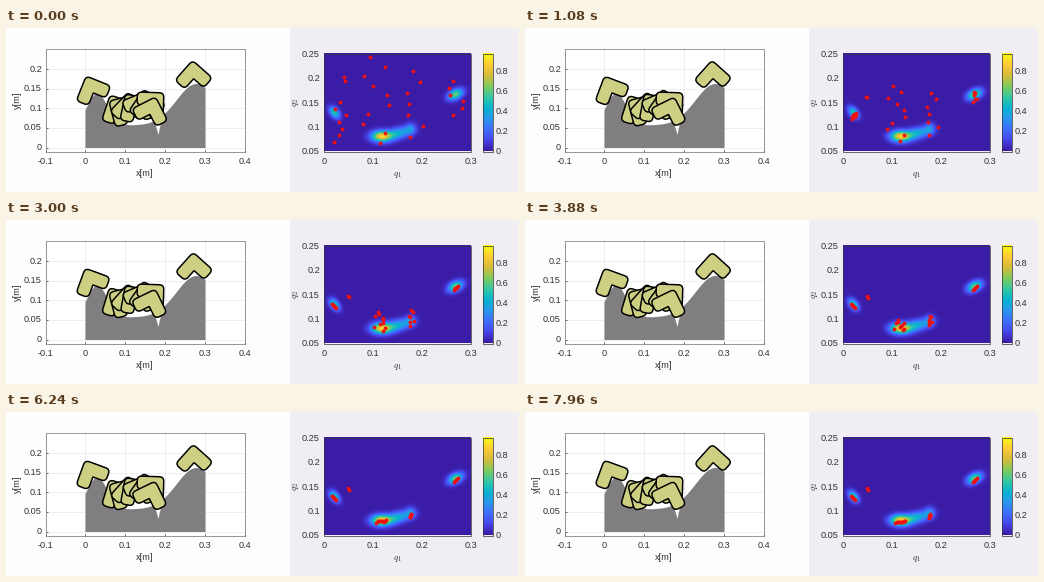
These frames come from a looping animation (513x164 px, 8000 ms). A matplotlib script:

```python
import numpy as np
import matplotlib.pyplot as plt
from matplotlib.animation import FuncAnimation
from matplotlib.colors import LinearSegmentedColormap
from matplotlib.patches import PathPatch, Rectangle
from matplotlib.path import Path

W, H, DPI = 513, 164, 100
STEP, FRAMES = 40, 200
PX = 72 / DPI
INK = "#333333"
rng = np.random.default_rng(4)

plt.rcParams["font.family"] = "Liberation Sans"
plt.rcParams["mathtext.fontset"] = "cm"

fig = plt.figure(figsize=(W / DPI, H / DPI), dpi=DPI, facecolor="#fdfdfd")
ax = fig.add_axes([0, 0, 1, 1])

parula = LinearSegmentedColormap.from_list("parula", [
    "#3a1ca6", "#4746eb", "#3e6fff", "#2797eb", "#08b4cf",
    "#36c8a0", "#81cc59", "#d9ba3a", "#fdcb33", "#f9fb15"])


def label(x, y, s, ha="center", size=9.2, **kw):
    ax.text(x, y, s, fontsize=size * PX, ha=ha, va="center", color=INK, **kw)


def line(xs, ys, color=INK):
    ax.plot(xs, ys, color=color, lw=0.7 * PX, zorder=1,
            solid_capstyle="butt")


def frame_box(x0, y0, x1, y1, z=6, color=INK):
    ax.add_patch(Rectangle((x0, y0), x1 - x0, y1 - y0, fill=False,
                           ec=color, lw=0.7 * PX, zorder=z))


# Left plot: axes and terrain
LX0, LY0, LX1, LY1 = 39.5, 20.5, 238.5, 123.5
ax.add_patch(Rectangle((LX0, LY0), LX1 - LX0, LY1 - LY0, fc="white", zorder=0))
for i in range(6):
    x = LX0 + 39.8 * i
    line([x, x], [LY0, LY1], "#e8e8e8")
    line([x, x], [LY1 - 2, LY1])
    label(x, 133, f"{(i - 1) / 10:g}")
for i in range(5):
    y = 119.5 - 19.6 * i
    line([LX0, LX1], [y, y], "#e8e8e8")
    line([LX0, LX0 + 2], [y, y])
    label(36, y, f"{i / 20:g}", ha="right")
frame_box(LX0, LY0, LX1, LY1, z=2, color="#707070")
label(138.5, 146, "x[m]")
label(11, 72, "y[m]", rotation=90)

gx = np.linspace(79, 199, 121)
ground = (97 - 32 * np.exp(-((gx - 91) / 14) ** 2)
          - 41.5 * np.exp(-((gx - 190) / 28) ** 2)
          + 16 * np.clip(1 - abs(gx - 152) / 4, 0, 1))
ax.fill_between(gx, ground, 119.5, color="#807e80", lw=0, zorder=3)


def rounded(points, radii):
    """Closed path whose corners are cut by quadratic curves."""
    verts, codes = [], []
    for i, (p, r) in enumerate(zip(points, radii)):
        before, after = points[i - 1] - p, points[(i + 1) % len(points)] - p
        verts += [p + r * before / np.hypot(*before), p,
                  p + r * after / np.hypot(*after)]
        codes += [Path.LINETO, Path.CURVE3, Path.CURVE3]
    codes[0] = Path.MOVETO
    return Path(verts + [verts[0]], codes + [Path.CLOSEPOLY])


def turn(points, deg):
    a = np.radians(deg)
    return points @ np.array([(np.cos(a), np.sin(a)), (-np.sin(a), np.cos(a))])


ARM, THICK = 26.5, 13
corners = np.array([(0, 0), (ARM, 0), (ARM, THICK), (THICK, THICK),
                    (THICK, ARM), (0, ARM)]) - 11.5
bracket = rounded(turn(corners, 45), [4.5, 4.5, 4.5, 0.5, 4.5, 4.5])


def placed(x, y, deg):
    return Path(turn(bracket.vertices, deg) + (x, y), bracket.codes)


# Brackets as (x, y, angle): two on the hills, a heap in the valley
poses = [(86, 63, -25), (188, 48.5, -3)]
for i, u in enumerate(np.linspace(0, 1, 7)):
    poses.append((111 + 35 * u, 82 - 6 * u, -50 + 75 * u + 22 * (-1) ** i))
poses.append((144, 84.5, 19))
poses = np.array(poses)
drift = rng.uniform(-1, 1, poses.shape) * (0.6, 0.6, 2)

shapes = []
for i, pose in enumerate(poses):
    patch = PathPatch(placed(*pose), fc="#cdd083", ec="black",
                      lw=1.5 * PX, zorder=4 + 0.01 * i)
    shapes.append(ax.add_patch(patch))

# Right plot: density map
ax.add_patch(Rectangle((284, 0), W - 284, H, fc="#f0eef2", zorder=0))
RX0, RY0, RX1, RY1 = 318, 26, 465, 123.5
mx, my = np.meshgrid(np.linspace(RX0, RX1, 60), np.linspace(RY0, RY1, 50))


def blob(x, y, sx, sy, peak, tilt=0):
    dx, dy = mx - x, my - y
    dy = dy - tilt * dx
    return peak * np.exp(-(dx / sx) ** 2 / 2 - (dy / sy) ** 2 / 2)


density = (blob(327.5, 85.5, 3.6, 3.6, 0.55, 0.5)
           + blob(450.5, 67, 5.2, 3.6, 0.65, -0.3)
           + blob(375, 109.5, 7, 3.8, 0.85)
           + blob(392, 106.5, 9, 4, 0.42, -0.2)
           + blob(405, 102, 3.5, 4, 0.25))
image = dict(cmap=parula, aspect="auto", zorder=1)
ax.imshow(density, vmin=0, vmax=0.97, extent=(RX0, RX1, RY1, RY0),
          interpolation="bilinear", **image)
frame_box(RX0, RY0, RX1, RY1)
for i in range(4):
    label(RX0 + 49 * i, 133.5, f"{i / 10:g}")
for i in range(5):
    label(314, RY1 - 24.4 * i + 0.3, f"{(i + 1) / 20:g}", ha="right")
label(391.5, 147, "$q_1$")
label(290, 75, "$q_2$", rotation=90)

BX0, BX1 = 477, 487
ax.imshow(np.linspace(1, 0, 98)[:, None], extent=(BX0, BX1, RY1, RY0), **image)
frame_box(BX0, RY0, BX1, RY1)
for i in range(5):
    label(490, RY1 - 20 * i + 0.3, f"{i / 5:g}", ha="left")

ax.set_xlim(0, W)
ax.set_ylim(H, 0)
ax.axis("off")

# Modes: count, rate, rest centre and spread, basin centre and half size
MODES = [
    (2, 2.4, (342.5, 77), (0.5, 0.8), (338, 51), (4, 2)),
    (7, 3.2, (328, 86), (2, 2), (333, 94), (8, 20)),
    (6, 2.6, (450, 68), (2.4, -1.6), (449, 70), (9, 17)),
    (7, 0.9, (404.5, 104), (0.6, -1.8), (406, 76), (12, 33)),
    (10, 0.9, (375.5, 110), (5, -0.8), (370, 72), (15, 43)),
]
start, rest, rate = [], [], []
for count, speed, centre, spread, basin, size in MODES:
    u = np.linspace(-1, 1, count)
    scatter = np.column_stack([rng.uniform(-1, 1, count), u])
    start.append(basin + scatter * size)
    rest.append(centre + np.outer(rng.permutation(u), spread))
    rate.append(np.full((count, 1), speed))
start, rest, rate = map(np.vstack, (start, rest, rate))
dots, = ax.plot(*start.T, "o", ms=3.8 * PX, mfc="#f01010", mec="none",
                zorder=5)


def draw(i):
    t = i * STEP / 1000
    pull = 0.4 * t + 0.05 * t * t
    dots.set_data(*(rest + (start - rest) * np.exp(-pull * rate)).T)
    for shape, pose in zip(shapes, poses + drift * np.exp(-2.2 * pull)):
        shape.set_path(placed(*pose))
    return [dots, *shapes]


anim = FuncAnimation(fig, draw, frames=FRAMES, interval=STEP,
                     repeat=True, repeat_delay=0, blit=False)
plt.show()
```
